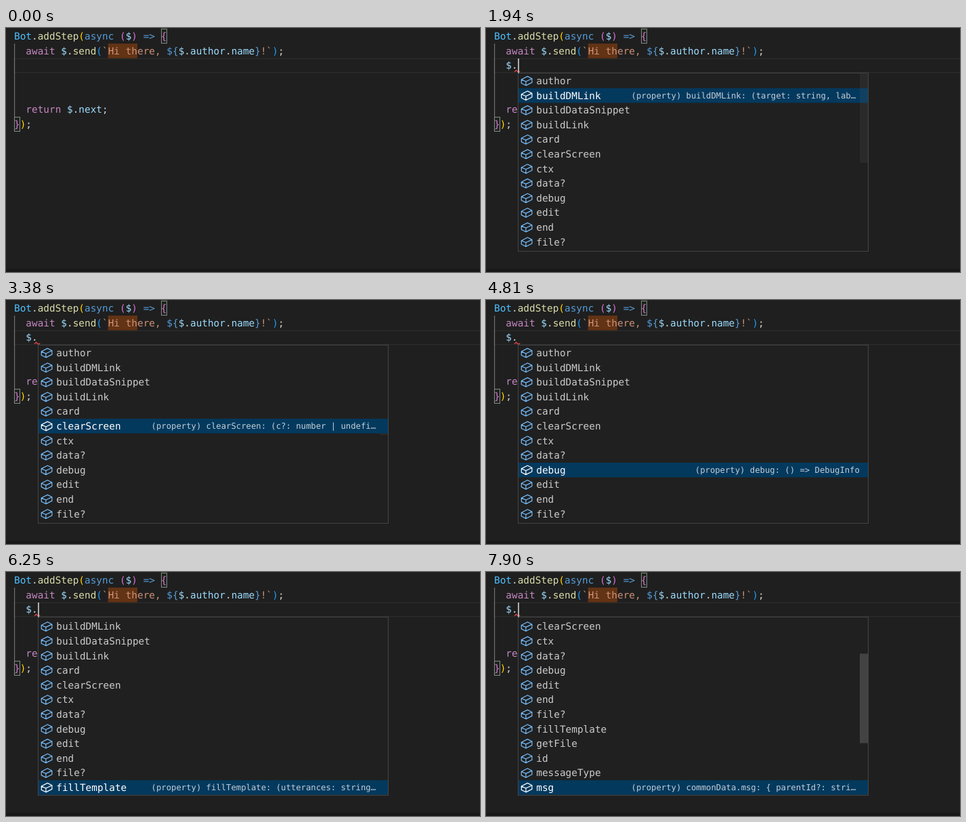
An HTML page for the animation above (8000 ms loop, 700 px wide and 360 px high).

```html
<!DOCTYPE html>
<html lang="en">
<head>
<meta charset="utf-8">
<title>Editor autocomplete</title>
<style>
  html, body { margin: 0; width: 100%; height: 100%; overflow: hidden; background: #1f1f1f; }
  svg { display: block; width: 700px; height: 360px; }
  text {
    font: 14.4px "DejaVu Sans Mono", monospace;
    white-space: pre;
    text-rendering: geometricPrecision;
    font-variant-ligatures: none;
    fill: #d4d4d4;
  }
  .label { fill: #cccccc; }
  .icon { fill: none; stroke: #75beff; stroke-width: 1; stroke-linejoin: round; }
  .selected .label { fill: #fff; }
  .selected .icon { stroke: #fff; }
  .detail { font-size: 12.24px; fill: #c3cfd8; }
  .bracket { fill: rgba(0, 100, 0, .1); stroke: #888; }
</style>
</head>
<body>
<svg id="stage" viewBox="0 0 700 360"></svg>
<script>
const LOOP = 8000;
const LINE = 21.6, CHAR = 8.669, LEFT = 12, TOP = 1.4, BASELINE = 15.8;
const DETAIL_CHAR = 7.37, DETAIL_MAX = 45;
const LIST_TOP = 67.2, LIST_HEIGHT = 261.6, ITEM_COUNT = 24;

const blue = '#569cd6', sky = '#9cdcfe', yellow = '#dcdcaa', gold = '#ffd700',
      orchid = '#da70d6', pink = '#c586c0', string = '#ce9178', plain = '#d4d4d4';

const code = [
  [0, 0, ['Bot', '#4fc1ff'], ['.', plain], ['addStep', yellow], ['(', gold], ['async ', blue],
    ['(', orchid], ['$', sky], [')', orchid], [' => ', blue], ['{', orchid]],
  [1, 2, ['await ', pink], ['$', sky], ['.', plain], ['send', yellow], ['(', '#179fff'],
    ['`Hi there, ', string], ['${', blue], ['$', sky], ['.', plain], ['author', sky], ['.', plain],
    ['name', sky], ['}', blue], ['!`', string], [')', '#179fff'], [';', plain]],
  [5, 2, ['return ', pink], ['$', sky], ['.', plain], ['next', sky], [';', plain]],
  [6, 0, ['}', orchid], [')', gold], [';', plain]],
];

const items = [
  ['author', 'commonData.author: { id: string; name: string }'],
  ['buildDMLink', 'buildDMLink: (target: string, label: string)'],
  ['buildDataSnippet', 'buildDataSnippet: (data: unknown) => string'],
  ['buildLink', 'buildLink: (destinationURL: string, label)'],
  ['card', 'card: (content: CardContent) => Promise<void>'],
  ['clearScreen', 'clearScreen: (c?: number | undefined) => void'],
  ['ctx', 'commonData.ctx: { [key: string]: unknown }'],
  ['data?', 'commonData.data?: string | undefined'],
  ['debug', 'debug: () => DebugInfo'],
  ['edit', 'edit: (message: string, id?: string) => void'],
  ['end', 'end: () => Promise<void>'],
  ['file?', 'commonData.file?: FileInfo | undefined'],
  ['fillTemplate', 'fillTemplate: (utterances: string[]) => string'],
  ['getFile', 'getFile: (id: string) => Promise<Buffer>'],
  ['id', 'commonData.id: string'],
  ['messageType', 'commonData.messageType: string'],
  ['msg', 'commonData.msg: { parentId?: string; id: string }'],
];

// Step tables: [time, value]
const typing = [[0, ''], [120, '$'], [900, '$.']];
const caretSteps = [[0, 0], [120, 1], [690, 0], [900, 1], [1400, 0], [1940, 1], [2420, 0], [2900, 1],
  [3380, 0], [3910, 1], [4450, 0], [4870, 1], [5410, 0], [5890, 1], [6430, 0], [6930, 1], [7430, 0], [7900, 1]];
const popupSteps = [[0, ''], [180, 'single'], [900, ''], [990, 'list']];
const selectTimes = [0, 1700, 2300, 2720, 3020, 3380, 3730, 4090, 4810, 5170, 5590, 5890, 6250, 6600, 6900, 7260, 7600];
const selection = selectTimes.map((time, i) => [time, i]);

const valueAt = (steps, t) => {
  let value = steps[0][1];
  for (const [time, next] of steps) if (time <= t) value = next;
  return value;
};

const stage = document.getElementById('stage');
function add(parent, tag, attrs = {}, content = '') {
  const node = document.createElementNS('http://www.w3.org/2000/svg', tag);
  for (const name in attrs) node.setAttribute(name, attrs[name]);
  node.textContent = content;
  return parent.appendChild(node);
}
const rect = (parent, x, y, width, height, fill, more = {}) =>
  add(parent, 'rect', { x, y, width, height, fill, ...more });
const show = (node, on) => { node.style.display = on ? '' : 'none'; };
const lineTop = row => TOP + row * LINE;

function codeLine(row, indent, parts) {
  const text = add(stage, 'text', { x: LEFT + indent * CHAR, y: lineTop(row) + BASELINE });
  return parts.map(([content, color]) => add(text, 'tspan', { style: `fill:${color}` }, content));
}

function itemRow(parent, label, y) {
  const row = add(parent, 'g', { transform: `translate(0 ${y})` });
  add(row, 'path', {
    class: 'icon', transform: 'translate(50.5 1.2) scale(1.2)',
    d: 'M1.5 6.4 9 2.5 14.5 5.3V10L7 13.7 1.5 10.9ZL7 8.8 14.5 5.3M7 8.8V13.7',
  });
  add(row, 'text', { class: 'label', x: 74.3, y: BASELINE }, label);
  return row;
}

function setDetail(node, content) {
  const text = content.length > DETAIL_MAX ? content.slice(0, DETAIL_MAX - 1) + '…' : content;
  const x = content.length > DETAIL_MAX ? 214.6 : 552 - text.length * DETAIL_CHAR;
  node.textContent = text;
  node.setAttribute('x', x);
}

// Editor
rect(stage, 0, 0, 700, 360, '#1f1f1f');
rect(stage, 0, 355.5, 700, 5, '#181818');
rect(stage, LEFT, 45.4, 710, 20.2, 'none', { stroke: '#2b2b2b', 'stroke-width': 1.5 });
rect(stage, 12, 23, 1.2, 108, '#707070');
rect(stage, LEFT + 16 * CHAR, 23, 5 * CHAR, LINE, '#623314');
for (const [column, row] of [[25, 0], [0, 6]]) {
  add(stage, 'rect', {
    class: 'bracket', x: Math.round(LEFT + column * CHAR) + .5,
    y: Math.round(lineTop(row)) + .5, width: 8, height: 21,
  });
}
for (const [row, indent, ...parts] of code) codeLine(row, indent, parts);
const [dollar, dot] = codeLine(2, 2, [['', sky], ['', plain]]);
const squiggle = add(stage, 'path', {
  d: 'M42 64.8 44.5 62.3 47.8 65.3 50.3 64', fill: 'none', stroke: '#f14c4c', 'stroke-width': 1.2,
});

// One-row popup
const single = add(stage, 'g', { transform: 'translate(-8.6 0)' });
rect(single, 47.5, 66.5, 517, 24, '#202020', { stroke: '#454545' });
rect(single, 48, LIST_TOP, 516, LINE, '#04395e');
itemRow(single, '$', LIST_TOP).setAttribute('class', 'selected');
setDetail(add(single, 'text', { class: 'detail', y: LIST_TOP + 14.9 }), '(parameter) $: StepContext');

// Full list
const list = add(stage, 'g');
rect(list, 47.5, 66.5, 517, 263, '#202020', { stroke: '#454545' });
const clip = add(stage, 'clipPath', { id: 'listClip' });
rect(clip, 48, LIST_TOP, 516, LIST_HEIGHT);
const view = add(list, 'g', { 'clip-path': 'url(#listClip)' });
const content = add(view, 'g');
const highlight = rect(content, 48, 0, 516, LINE, '#04395e');
const rows = items.map(([label], i) => itemRow(content, label, i * LINE));
const detail = add(content, 'text', { class: 'detail' });
const ratio = LIST_HEIGHT / (ITEM_COUNT * LINE);
const thumbHeight = LIST_HEIGHT * ratio;
const thumb = rect(list, 552, LIST_TOP, 12, thumbHeight, 'rgba(121,121,121,.4)');
const faintHead = rect(list, 552, LIST_TOP, 12, LINE, 'rgba(121,121,121,.11)');
const faintTail = rect(list, 552, LIST_TOP, 12, 0, 'rgba(121,121,121,.11)');

const caret = rect(stage, 0, 45, 2, LINE, '#aeafad');

function drawList(t) {
  const selected = valueAt(selection, t);
  const y = selected * LINE;
  const scroll = Math.max(0, y + LINE - LIST_HEIGHT);
  content.setAttribute('transform', `translate(0 ${LIST_TOP - scroll})`);
  highlight.setAttribute('y', y);
  rows.forEach((row, i) => row.setAttribute('class', i === selected ? 'selected' : ''));
  detail.setAttribute('y', y + 14.9);
  setDetail(detail, '(property) ' + items[selected][1]);

  show(thumb, t >= 6310);
  thumb.setAttribute('y', LIST_TOP + scroll * ratio);

  // The fading scrollbar is wiped row by row as the selection passes.
  const wiped = selected < 2 ? LINE : y + LINE;
  show(faintHead, selected < 5);
  faintTail.setAttribute('y', LIST_TOP + wiped);
  faintTail.setAttribute('height', Math.max(0, thumbHeight - wiped));
}

function draw(t) {
  const typed = valueAt(typing, t);
  dollar.textContent = typed.slice(0, 1);
  dot.textContent = typed.slice(1);
  caret.setAttribute('x', Math.round(LEFT + (2 + typed.length) * CHAR));
  show(caret, valueAt(caretSteps, t));
  show(squiggle, t >= 1290);
  const popup = valueAt(popupSteps, t);
  show(single, popup === 'single');
  show(list, popup === 'list');
  drawList(t);
}

const start = performance.now();
function tick() {
  draw((performance.now() - start) % LOOP);
  requestAnimationFrame(tick);
}
tick();
</script>
</body>
</html>
```
